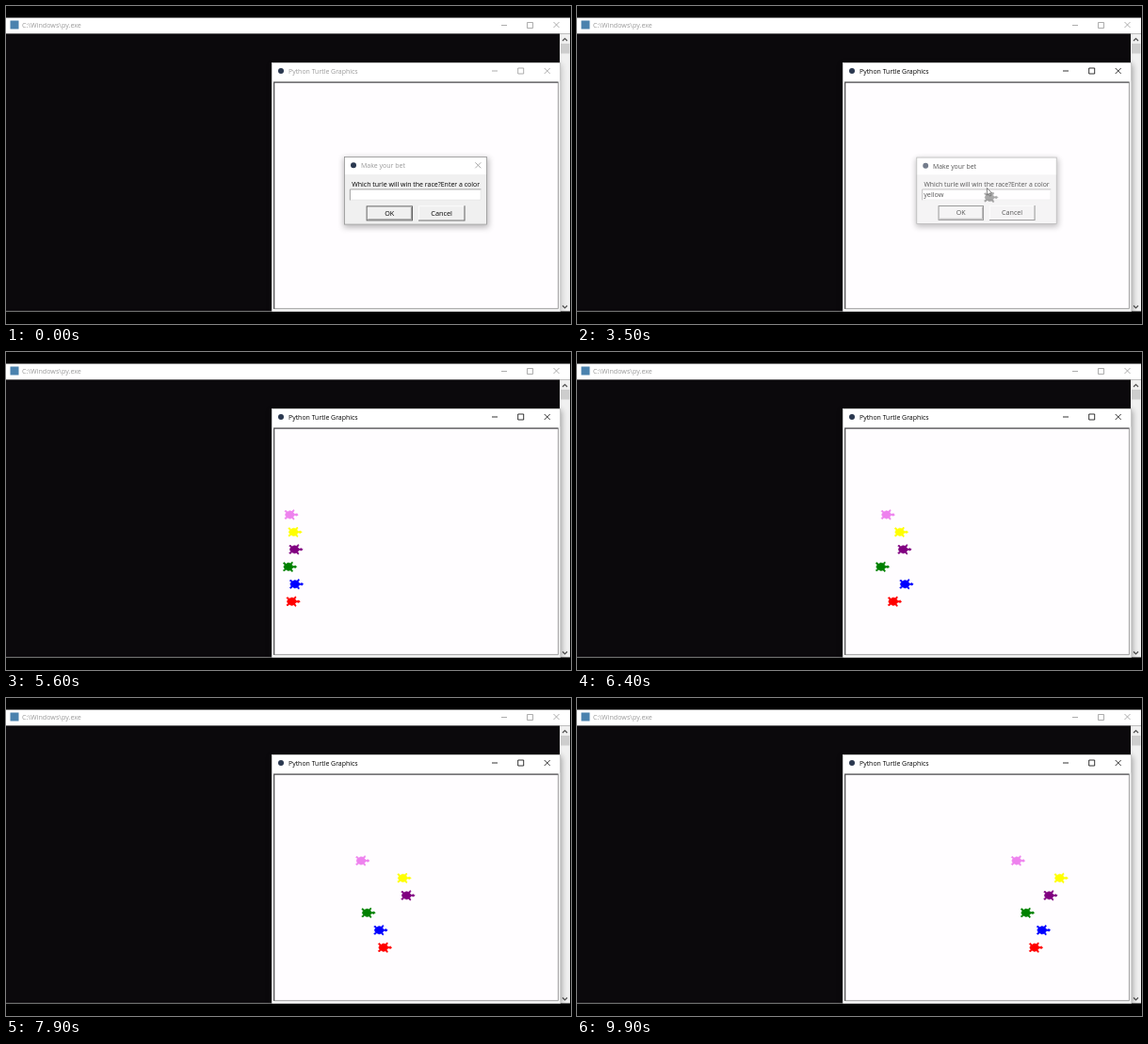
Write an HTML page that moves like this. It is 600 by 338 pixels and loops after 10000 ms.

```html
<!DOCTYPE html>
<html lang="en">
<head>
<meta charset="utf-8">
<title>Turtle race</title>
<style>
  html, body { margin: 0; width: 100%; height: 100%; overflow: hidden; background: #000; }
  svg { display: block; width: 100vw; height: 100vh; }
  text { font: 7px "Open Sans", "Noto Sans", sans-serif; }
  .line { fill: none; stroke: currentColor; stroke-width: .8; }
  .label { fill: currentColor; }
</style>
</head>
<body>
<svg viewBox="0 0 600 338" xmlns="http://www.w3.org/2000/svg">
  <defs>
    <filter id="blur" x="-20%" y="-20%" width="140%" height="140%"><feGaussianBlur stdDeviation="3"/></filter>
    <clipPath id="field"><rect x="285" y="82" width="302" height="240"/></clipPath>
    <clipPath id="desk"><rect y="12" width="599" height="313"/></clipPath>
  </defs>
  <rect width="600" height="338"/>

  <!-- console -->
  <rect y="12.5" width="599" height="17.1" fill="#fff"/>
  <rect y="29.6" width="588" height="295" fill="#0b090c"/>
  <rect x="588" y="29.6" width="11" height="295" fill="#f0f0f0"/>
  <rect x="589" y="40" width="9.5" height="10.5" fill="#cdcdcd"/>
  <path d="M591 37l2.5-2.5 2.5 2.5M591 318.5l2.5 2.5 2.5-2.5" fill="none" stroke="#505050" stroke-width="1.2"/>
  <rect y="324" width="599" height="1" fill="#777"/>
  <rect x="4.5" y="15.5" width="9" height="9" fill="#4a82ae"/>
  <g color="#999">
    <text class="label" x="17" y="23.2" style="font-size:7.15px">C:\Windows\py.exe</text>
    <path class="line" d="M526 20.5h6M553.5 17.5h6v6h-6zM581.5 17l6 6m0-6l-6 6"/>
  </g>

  <!-- turtle window -->
  <g clip-path="url(#desk)"><rect id="frameShade" x="282" y="62" width="308" height="264" filter="url(#blur)"/></g>
  <rect x="282" y="60" width="307" height="264.5" fill="#fff"/>
  <path d="M282.4 324.5V60.4H588.6V324.5" fill="none" stroke="#aaa" stroke-width=".7"/>
  <rect x="283" y="79.5" width="305.3" height="245" fill="#f4f4f4"/>
  <rect x="285" y="81" width="301.5" height="240.5" fill="#fffdff"/>
  <path d="M284.7 322V81.1H586.5" fill="none" stroke="#4a4a4c" stroke-width="1.2"/>
  <path d="M285 321.7H586.4V81" fill="none" stroke="#888" stroke-width=".8"/>
  <circle cx="292" cy="69" r="3" fill="#2b3950"/>
  <g id="frameTitle">
    <text class="label" x="300" y="71.6" style="font-size:6.95px">Python Turtle Graphics</text>
    <path class="line" d="M516 69h6M543.7 66h6v6h-6zM571.7 66l6 6m0-6l-6 6"/>
  </g>
  <g id="herd" clip-path="url(#field)"></g>

  <!-- bet dialog -->
  <g id="dialog">
    <rect id="shade" x="358.5" y="161.5" width="154" height="74" filter="url(#blur)"/>
    <rect x="359" y="160" width="152" height="72.5" fill="#f0f0f0"/>
    <rect x="359" y="160" width="152" height="19" fill="#fff"/>
    <rect x="359.4" y="160.4" width="151.2" height="71.7" fill="none" stroke="#909090" stroke-width=".8"/>
    <circle cx="369" cy="169.3" r="3" fill="#2b3950"/>
    <g id="betTitle">
      <text class="label" x="377" y="172.1">Make your bet</text>
      <path id="betClose" class="line" d="M498.3 166.3l6 6m0-6l-6 6"/>
    </g>
    <text x="367.3" y="191.6">Which turle will win the race?Enter a color</text>
    <rect x="365" y="194.5" width="139.5" height="12" fill="#fff"/>
    <path d="M365.4 206.5V194.9H504.5" fill="none" stroke="#999" stroke-width=".9"/>
    <path d="M366 206.2H504.2V195" fill="none" stroke="#e0e0e0" stroke-width=".7"/>
    <text id="entry" x="367" y="203.4" style="font-size:7.4px"></text>
    <rect id="caret" y="196.7" width=".9" height="8.3"/>
    <rect x="383.1" y="212.9" width="48.4" height="15" fill="#f0f0f0" stroke="#555" stroke-width=".9"/>
    <path d="M384.3 226.8H430.4V214" fill="none" stroke="#8a8a8a" stroke-width=".9"/>
    <rect x="438" y="212.3" width="49.3" height="16" fill="#f0f0f0"/>
    <path d="M438.4 228V212.7H487" fill="none" stroke="#fff" stroke-width=".8"/>
    <path d="M438 228H487V212.3" fill="none" stroke="#6e6e6e" stroke-width="1.1"/>
    <text x="407.2" y="222.8" text-anchor="middle" style="font-size:7.2px">OK</text>
    <text x="462.6" y="222.8" text-anchor="middle" style="font-size:7.3px">Cancel</text>
  </g>
  <path id="pointer" d="M435.4 193.5v7.4l1.8-1.6 1.2 2.7 1.2-.6-1.2-2.5h2.3z" fill="#fff" stroke="#333" stroke-width=".6"/>
</svg>
<script>
const LOOP = 10000, STEP = 100;
const HOME = { x: 437.3, y: 203.4 }, START = 290.5;
const PLACE_AT = 3570, PLACE_TIME = 282;
const RACE = [5300, 6400, 7900, 9100, 9900];
// colour and x position at each RACE time after the start; lanes run bottom to top
const RUNNERS = [
  ["#ff0000", 335, 400, 445.5, 485],
  ["#0000ff", 347.5, 395.5, 461.5, 493],
  ["#008000", 322, 382.5, 446.3, 476],
  ["#800080", 345.5, 424.5, 476.5, 500.5],
  ["#ffff00", 342, 420.5, 467.5, 511.7],
  ["#ee82ee", 327.8, 376.3, 428, 466]
];
const KEYS = [2200, 2400, 2700, 2800, 3000, 3200];
const CARET_FROM = 900, CLOSE = 3500;

const $ = id => document.getElementById(id);
const lerp = (a, b, k) => a + (b - a) * k;
const clamp = k => Math.max(0, Math.min(1, k));
const show = (el, on) => { el.style.display = on ? "" : "none"; };

// one half of the shell outline, mirrored: [sideways, forward]
const half = [[2, 14], [1, 10], [4, 7], [7, 9], [9, 8], [6, 5], [7, 1], [5, -3], [8, -6], [6, -8], [4, -5]];
const outline = [[0, 16], ...half, [0, -7], ...half.map(([s, f]) => [-s, f]).reverse()];
const shape = outline.map(([s, f]) => `${(f * .6).toFixed(1)},${(s * .6).toFixed(1)}`).join(" ");

const turtles = RUNNERS.map(([color, ...xs], i) => {
  const el = document.createElementNS("http://www.w3.org/2000/svg", "polygon");
  el.setAttribute("points", shape);
  el.setAttribute("stroke-width", ".6");
  $("herd").append(el);
  return { el, color, xs: [START, ...xs], lane: 265.2 - i * 18.45, born: PLACE_AT + i * PLACE_TIME };
});

function raceX(xs, t) {
  let i = 0;
  while (i < RACE.length - 2 && t > RACE[i + 1]) i++;
  return lerp(xs[i], xs[i + 1], clamp((t - RACE[i]) / (RACE[i + 1] - RACE[i])));
}

function drawTurtle(m, i, t) {
  const shown = t >= (i ? m.born : CLOSE);
  show(m.el, shown);
  if (!shown) return;
  const k = clamp((t - m.born) / PLACE_TIME);
  const x = k < 1 ? lerp(HOME.x, START, k) : raceX(m.xs, t);
  const y = lerp(HOME.y, m.lane, k);
  const color = t < m.born ? "#000" : m.color;
  m.el.setAttribute("transform", `translate(${x.toFixed(2)} ${y.toFixed(2)})`);
  m.el.setAttribute("fill", color);
  m.el.setAttribute("stroke", color);
}

function drawDialog(t) {
  const dialog = $("dialog"), closing = t >= CLOSE, active = t >= CARET_FROM && !closing;
  show(dialog, t < CLOSE + STEP);
  dialog.setAttribute("opacity", closing ? .66 : 1);
  dialog.setAttribute("transform", closing ? "translate(435 196) scale(.982) translate(-435 -196)" : "");
  $("betTitle").setAttribute("color", active || closing ? "#000" : "#999");
  show($("betClose"), !closing);
  $("shade").setAttribute("opacity", active || closing ? .38 : .28);
  $("entry").textContent = "yellow".slice(0, KEYS.filter(k => t >= k).length);
  // the caret blinks 600 ms on, 300 ms off
  const lit = active && (t - CARET_FROM) % 900 < 600;
  show($("caret"), lit);
  if (lit) $("caret").setAttribute("x", 367 + $("entry").getComputedTextLength());
}

function draw(now) {
  const t = Math.floor((now % LOOP) / STEP) * STEP;
  $("frameTitle").setAttribute("color", t < CLOSE ? "#999" : "#000");
  $("frameShade").setAttribute("opacity", t < CLOSE ? .2 : .35);
  drawDialog(t);
  turtles.forEach((m, i) => drawTurtle(m, i, t));
  show($("pointer"), t === CLOSE);
}

const begin = performance.now();
function tick() {
  draw(performance.now() - begin);
  requestAnimationFrame(tick);
}
tick();
</script>
</body>
</html>
```
